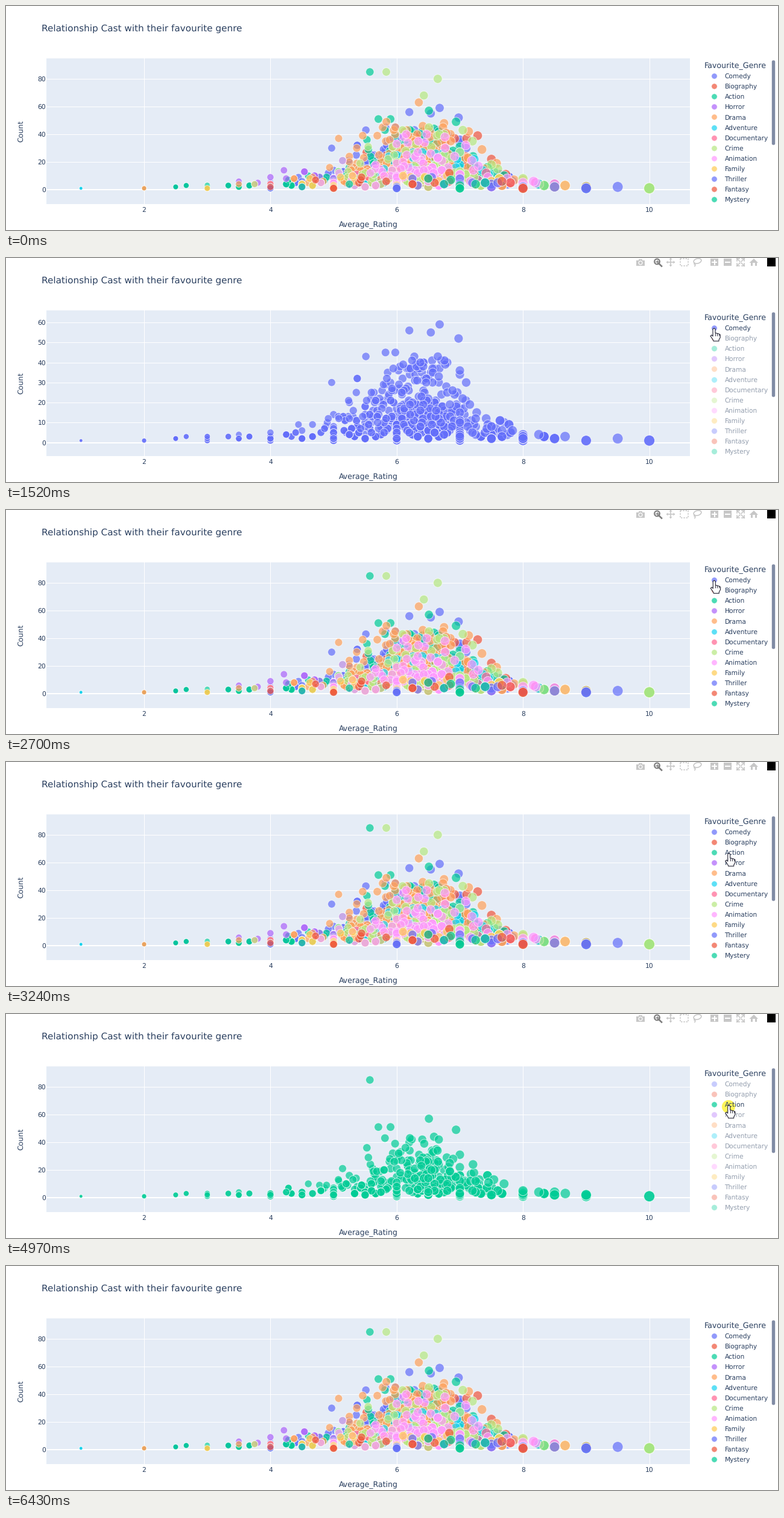
A matplotlib script for the animation above (6890 ms loop, 1280 px wide and 372 px high).

```python
import numpy as np
import matplotlib.pyplot as plt
from matplotlib.animation import FuncAnimation
from matplotlib.patches import Circle, Ellipse, FancyBboxPatch, Polygon, Rectangle

W, H, DPI = 1280, 372, 100
PX = 72 / DPI
FRAMES, STEP = 130, 53
INK, PLOT_BG = "#2a3f5f", "#e5ecf6"
ICON, ACTIVE = "#c7c7c7", "#7c7c7c"
BLUE, RED, GREEN = "#636efa", "#ef553b", "#00cc96"

plt.rcParams.update({"font.family": "DejaVu Sans", "text.hinting": "none"})
fig = plt.figure(figsize=(W / DPI, H / DPI), dpi=DPI, facecolor="white")
ax = fig.add_axes([0, 0, 1, 1])
ax.set(xlim=(0, W), ylim=(H, 0))
ax.axis("off")
rng = np.random.default_rng(11)


def label(x, y, text, size, **kw):
    return ax.text(x, y, text, fontsize=size * PX, color=INK, zorder=4, **kw)


def line(xs, ys, width, color="white", **kw):
    return ax.plot(xs, ys, color=color, lw=width * PX, **kw)[0]


def px_x(rating):
    return 19.6 + 104.7 * rating


def px_y(count, wide=True):
    return 305 - 2.3 * count if wide else 306.5 - 3.325 * count


# ---- data: each rating is a mean of n whole votes, so it is k / n ----
def rows():
    """Every mean that one to three votes can plausibly give."""
    return [(k / n, n) for n in (1, 2, 3) for k in range(n, 10 * n + 1)
            if abs(k / n - 5.5) <= 4.5 / n ** 0.4]


def cloud(size, scale, top, mid):
    """Means scatter like 1 / sqrt(n), with a longer tail to the left."""
    n = np.minimum(2 + rng.exponential(scale, size), top * rng.uniform(0.8, 1, size))
    n = n.astype(int)
    z = np.clip(rng.normal(size=size), -2.3, 2.3)
    z *= np.where(z < 0, 1.15, 0.88)
    x = np.clip(mid + 2.1 * z / np.sqrt(n), 2.5, 9)
    return list(zip(np.round(x * n) / n, n))


genres = []


def add(name, color, size, scale, top, mid=6.35, ones=(), peaks=(), base=0):
    """ones: whole ratings with a count of 1; peaks: (rating, count) outliers."""
    pts = rows() * base + cloud(size, scale, top, mid)
    pts += [(v, 1) for v in ones] * 2 + list(peaks)
    rating, count = np.array(pts).T
    dots = ax.scatter(px_x(rating), px_y(count), s=(18 * PX) ** 2 * rating / 10,
                      c=color, alpha=0.7, edgecolors="white", linewidths=0.9 * PX,
                      zorder=3)
    y = 116 + 17.1 * len(genres)
    key = ax.scatter([1173.5], [y], s=(9.4 * PX) ** 2, c=color, alpha=0.7,
                     edgecolors="white", linewidths=0.7 * PX, zorder=3.5)
    text = label(1191.5, y + 4, name, 10.65)
    genres.append((dots, key, text, px_x(rating), count))


add("Comedy", BLUE, 600, 11, 46, base=2,
    peaks=[(6.68, 59), (6.2, 56), (6.54, 55), (6.98, 52), (4.97, 30), (9.5, 2)])
add("Biography", RED, 60, 14, 48, mid=6.6)
add("Action", GREEN, 400, 9.5, 52, base=2,
    peaks=[(5.575, 85), (6.51, 57), (5.71, 51), (6.94, 49), (8.67, 3)])
add("Horror", "#ab63fa", 60, 5, 20, mid=5.7)
add("Drama", "#ffa15a", 340, 13, 50, ones=[2],
    peaks=[(6.35, 63), (5.08, 37), (7.14, 42), (7.35, 29), (7.58, 19)])
add("Adventure", "#19d3f3", 40, 11, 30, mid=6.5, ones=[1], peaks=[(8.25, 4)])
add("Documentary", "#ff6692", 45, 4, 14)
add("Crime", "#b6e880", 120, 14, 48, mid=6.5, ones=[10],
    peaks=[(5.835, 85), (6.65, 80), (6.43, 68), (8.5, 2)])
add("Animation", "#ff97ff", 120, 11, 41)
add("Family", "#fecb52", 20, 4, 12, ones=[3])
add("Thriller", BLUE, 20, 3, 10, ones=[4, 6, 9])
add("Fantasy", RED, 15, 4, 16, ones=[5, 8])
add("Mystery", GREEN, 8, 4, 9, ones=[7])

# ---- plot frame ----
ax.add_patch(Rectangle((66.5, 86.5), 1067.5, 242.5, color=PLOT_BG, lw=0, zorder=0))
for v in range(2, 11, 2):
    line([px_x(v)] * 2, [86.5, 329], 1, zorder=1)
    label(px_x(v), 341.5, str(v), 10.8, ha="center")


def y_axis(values, wide):
    parts = []
    for v in values:
        y = px_y(v, wide)
        parts.append(line([66.5, 1134], [y, y], 1 if v else 2, zorder=1))
        parts.append(label(66, y + 4, str(v), 10.8, ha="right"))
    return parts


wide_axis = y_axis(range(0, 81, 20), True)
close_axis = y_axis(range(0, 61, 10), False)

label(59, 41.5, "Relationship Cast with their favourite genre", 15.28)
label(600.5, 366.5, "Average_Rating", 12.5, ha="center")
label(26, 208, "Count", 12.3, rotation=90, ha="center", va="center")
label(1157.5, 102.5, "Favourite_Genre", 12.65)
ax.add_patch(FancyBboxPatch((1272, 92.5), 1, 136, boxstyle="round,pad=2.2",
                            fc="#808ba4", lw=0, zorder=4))

# ---- toolbar ----
toolbar = []


def icon(patch):
    toolbar.append(ax.add_patch(patch))


def block(x, y, w, h, color=ICON):
    icon(Rectangle((x - w / 2, y - h / 2), w, h, fc=color, lw=0, zorder=5))


def shape(pts):
    icon(Polygon(pts, closed=True, fc=ICON, lw=0, zorder=5))


def stroke(xs, ys, width=1.6, color=ICON, **kw):
    toolbar.append(line(xs, ys, width, color, zorder=5, **kw))


def plus(x, y, r, width, color):
    stroke([x - r, x + r], [y, y], width, color)
    stroke([x, x], [y - r, y + r], width, color)


# camera
block(1052, 8, 14, 9)
block(1052, 3.2, 6, 2)
icon(Circle((1052, 8), 3, fc=ICON, ec="white", lw=1.2 * PX, zorder=6))

# magnifier
icon(Circle((1079.5, 6), 4.4, fc="white", ec=ACTIVE, lw=2 * PX, zorder=5))
stroke([1082.6, 1087], [9.3, 13.6], 2.6, ACTIVE)
plus(1079.5, 6, 2.5, 1.4, ACTIVE)

# pan
plus(1102, 7, 6, 1.6, ICON)
for dx, dy in [(1, 0), (-1, 0), (0, 1), (0, -1)]:
    cx, cy = 1102 + 4.5 * dx, 7 + 4.5 * dy
    shape([(cx + 2.7 * dx, cy + 2.7 * dy), (cx + 2.6 * dy, cy + 2.6 * dx),
           (cx - 2.6 * dy, cy - 2.6 * dx)])

# box and lasso
stroke([1118, 1130.5, 1130.5, 1118, 1118], [1, 1, 13, 13, 1],
       linestyle=(0, (1.5, 1.2)))
icon(Ellipse((1146.5, 5), 13, 8, angle=-15, fc="none", ec=ICON, lw=1.6 * PX, zorder=5))
stroke([1141.5, 1141, 1143, 1142], [8, 10, 11, 13.5])

# zoom in and out
for x in (1174.5, 1196.5):
    block(x, 7, 12.5, 12.5)
plus(1174.5, 7, 3.5, 2, "white")
stroke([1193, 1200], [7, 7], 2, "white")

# autoscale
for sx in (-1, 1):
    for sy in (-1, 1):
        cx, cy = 1218 + 6.3 * sx, 7 + 6.3 * sy
        stroke([cx - 4 * sx, cx, cx], [cy, cy, cy - 4 * sy])
        stroke([1218 + 1.2 * sx, cx], [7 + 1.2 * sy, cy])

# home
shape([(1232.5, 8), (1240, 1), (1247, 8)])
for x in (1236.4, 1243.4):
    block(x, 10.4, 3.6, 5)
block(1268.5, 7, 14, 14, "black")

# ---- pointer ----
HAND = np.array([(-2, 1), (0, -0.4), (2, 1), (2, 7.4), (8, 9), (10.4, 10.6), (10.2, 15),
                 (8, 19), (8, 21), (-1, 21), (-1.6, 19), (-6, 12.6), (-4, 10.8), (-2, 13)])
ARROW = np.array([(0, 0), (0, 16), (3.7, 12.6), (6.2, 18.4), (8.6, 17.4),
                  (6.2, 11.8), (11.2, 11.4)])
pointer = ax.add_patch(Polygon(HAND, closed=True, fc="white", ec="#222233",
                               lw=1.1 * PX, joinstyle="round", zorder=9))
fingers = [line([], [], 0.9, "#222233", zorder=10) for _ in range(3)]
halo = ax.add_patch(Circle((0, 0), 11, fc="#fff000", lw=0, alpha=0.65, zorder=3.8))

# enters from below, rests on Comedy, then on Action, and leaves
STOPS = np.array([(1130, 385), (1174, 117), (1198.7, 152), (1080, 390)])
MOVES = [(130, 720), (2660, 3150), (5570, 6230)]
# a double click on the legend shows one genre or brings all back
SOLO = {1520: 0, 2660: None, 4040: 2, 5300: None}
CLICKS = [end - lead for end in SOLO for lead in (340, 190)]


def tip(t):
    pos = STOPS[0].astype(float)
    for (start, end), step in zip(MOVES, np.diff(STOPS, axis=0)):
        u = np.clip((t - start) / (end - start), 0, 1)
        pos += step * u * u * (3 - 2 * u)
    return pos


def move_pointer(t):
    x, y = tip(t)
    hand = 620 <= t < 5700
    pointer.set_xy((HAND if hand else ARROW) + (x, y))
    for k, finger in enumerate(fingers):
        fx = x + 2 + 2.9 * k
        finger.set_data([fx, fx], [y + 7.6 + 0.7 * k, y + 11.5])
        finger.set_visible(hand)
    halo.center = (x - 0.8, y + 2)
    halo.set_visible(any(0 <= t - c < 70 for c in CLICKS))


def show_genres(solo):
    wide = solo != 0
    for part in wide_axis:
        part.set_visible(wide)
    for part in close_axis:
        part.set_visible(not wide)
    for k, (dots, key, text, xs, count) in enumerate(genres):
        on = solo in (None, k)
        dots.set_visible(on)
        dots.set_offsets(np.column_stack([xs, px_y(count, wide)]))
        key.set_alpha(0.7 if on else 0.35)
        text.set_alpha(1 if on else 0.5)


def update(i):
    t = i * STEP + 40
    past = [time for time in SOLO if time <= t]
    show_genres(SOLO[past[-1]] if past else None)
    fade = np.interp(t, [130, 430, 6290, 6430], [0, 1, 1, 0])
    for part in toolbar:
        part.set_alpha(fade)
    move_pointer(t)
    return []


anim = FuncAnimation(fig, update, frames=FRAMES, interval=STEP, repeat=True,
                     repeat_delay=0, blit=False)
plt.show()
```
